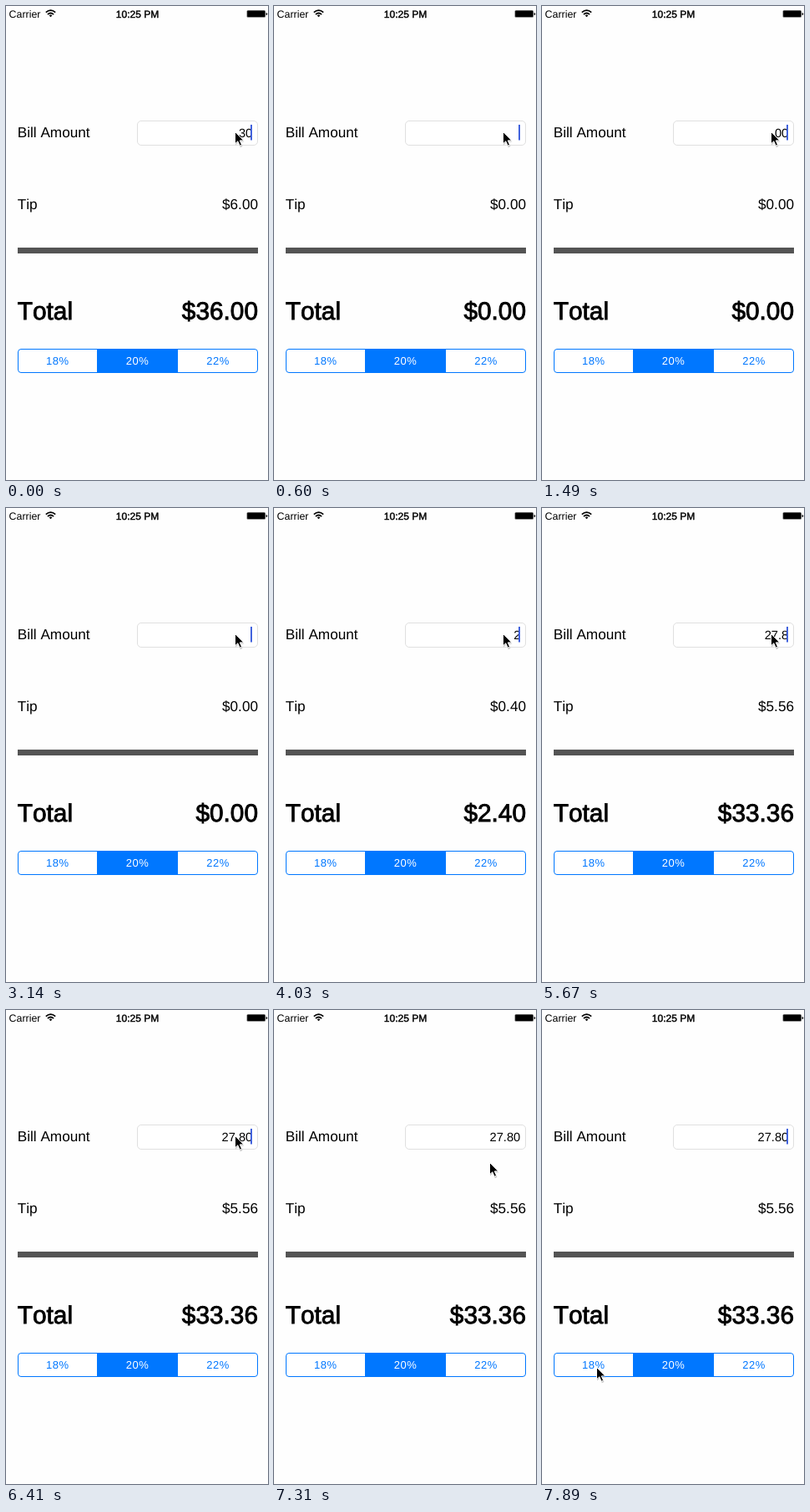
Write an HTML page that moves like this. It is 314x567 px and loops after 8000 ms.

```html
<!DOCTYPE html>
<html lang="en">
<head>
<meta charset="utf-8">
<title>Tip calculator</title>
<style>
  html, body { margin: 0; width: 100%; height: 100%; overflow: hidden; background: #fefefe; }
  svg { display: block; width: 314px; height: 567px; }
  text {
    font-family: "Liberation Sans", Arial, sans-serif; white-space: pre;
    font-kerning: none; text-rendering: geometricPrecision;
  }
  .label { font-size: 17.2px; }
  .total { font-size: 29.8px; stroke: #000; stroke-width: .9px; }
  .right { text-anchor: end; }
  .segment { font-size: 13px; letter-spacing: .5px; text-anchor: middle; fill: #0077ff; }
</style>
</head>
<body>
<svg viewBox="0 0 314 567">
  <!-- Status bar -->
  <text x="3.6" y="13.6" font-size="12.4">Carrier</text>
  <g fill="none" stroke="#000" stroke-width="1.7">
    <path d="M47.8 7.7Q53.5 2.5 59.2 7.7M49.9 10.1Q53.5 6.9 57.1 10.1"/>
    <path d="M51.6 11.3Q53.5 9.8 55.4 11.3L53.5 13.3Z" fill="#000" stroke="none"/>
  </g>
  <text x="157.5" y="13.6" font-size="12" text-anchor="middle" stroke="#000" stroke-width=".45">10:25 PM</text>
  <rect x="288.5" y="5" width="22.5" height="8.8" rx="1.5" opacity=".55"/>
  <rect x="289.2" y="5.7" width="21.1" height="7.4" rx=".8"/>
  <path d="M311.6 8Q313.2 8 313.2 9.5T311.6 11Z"/>

  <!-- Bill, tip and total -->
  <text class="label" x="13.7" y="156.6">Bill Amount</text>
  <rect x="157.5" y="137.5" width="144" height="29" rx="4.5" fill="#fff" stroke="#e0e0e0"/>
  <text id="bill" class="right" x="295.3" y="156.8" font-size="14.7"></text>
  <rect id="caret" x="293" y="142" width="2" height="18.5" fill="#4263dd"/>
  <text class="label" x="13.7" y="242.6">Tip</text>
  <text id="tip" class="label right" x="302" y="242.6"></text>
  <rect x="14" y="289" width="288" height="7" fill="#545454"/>
  <text class="total" x="13.8" y="374.5">Total</text>
  <text id="total" class="total right" x="302" y="374.5"></text>

  <!-- Tip rates -->
  <rect x="14.5" y="410.5" width="287" height="28" rx="3.5" fill="#fff" stroke="#0077ff"/>
  <rect x="109" y="410" width="97" height="29" fill="#0077ff"/>
  <text class="segment" x="61.7" y="429">18%</text>
  <text class="segment" x="157.5" y="429" style="fill:#fff">20%</text>
  <text class="segment" x="254" y="429">22%</text>

  <g id="pointer">
    <path d="M.5 1V15.5L3.8 12.5 6.3 18.2 9 17 6.5 11.5H11Z" opacity=".2" transform="translate(.5 1)"/>
    <path d="M.5.5V14.8L3.8 11.8 6.2 17.2 8.6 16.2 6.3 10.9H10.8Z" stroke="#fff" stroke-width="1"/>
  </g>
</svg>
<script>
  const DURATION = 8000;
  const RATE = 0.2;

  // [start ms, typed amount, caret opacity]
  const typing = [
    [0, "30", 1], [300, "3", 1], [600, "", 1],
    [1050, "", .5], [1200, "", 0], [1340, "0", 1], [1490, "00", 1],
    [2090, "00", .5], [2240, "00", 0], [2540, "00", .5], [2690, "00", 1],
    [2840, "0", 1], [3140, "", 1], [3580, "", .5], [3730, "", 0],
    [4030, "2", 1], [4620, "2", .5], [4770, "27", 1], [5070, "27.", 1],
    [5520, "27.", .5], [5670, "27.8", 1], [6120, "27.8", .5], [6270, "27.8", 0],
    [6410, "27.80", 1], [7010, "27.80", .5], [7160, "27.80", 0],
    [7460, "27.80", .5], [7600, "27.80", 1]
  ];

  // [start ms, x, y]
  const moves = [
    [0, 274, 150], [7160, 272, 154], [7310, 258, 182], [7460, 198, 290],
    [7600, 106, 418], [7750, 70, 440], [7890, 65, 427]
  ];

  const $ = id => document.getElementById(id);
  const current = (steps, t) => steps.findLast(step => step[0] <= t);
  const money = value => "$" + value.toFixed(2);

  function draw(t) {
    const [, amount, opacity] = current(typing, t);
    const [, x, y] = current(moves, t);
    const bill = Number(amount);
    $("bill").textContent = amount;
    $("caret").setAttribute("opacity", opacity);
    $("tip").textContent = money(bill * RATE);
    $("total").textContent = money(bill * (1 + RATE));
    $("pointer").setAttribute("transform", `translate(${x} ${y})`);
  }

  const start = performance.now();
  function tick() {
    draw((performance.now() - start) % DURATION);
    requestAnimationFrame(tick);
  }
  tick();
</script>
</body>
</html>
```
